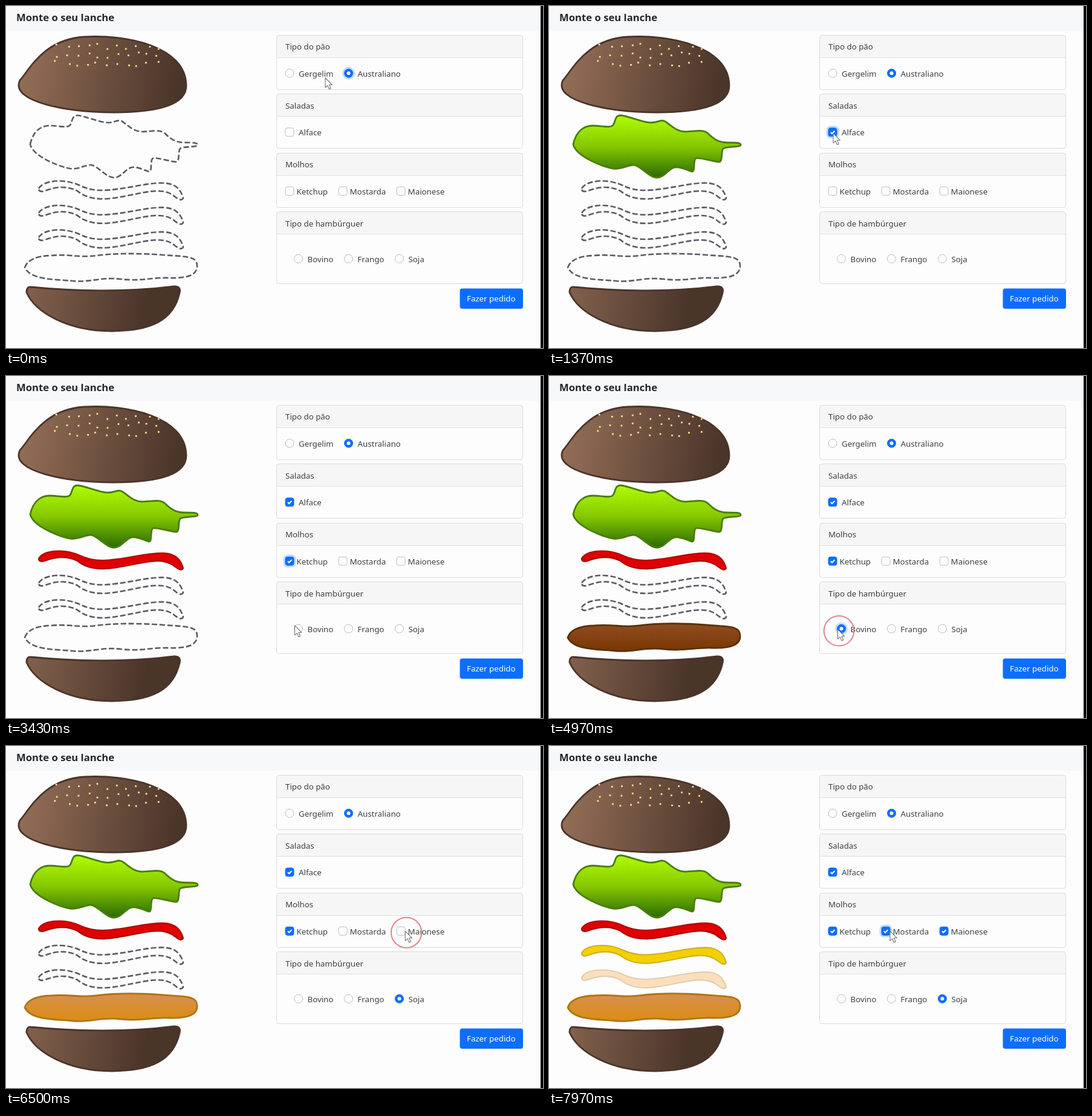
Animation of 888 by 566 pixels, one loop 8000 ms. Source, as an HTML page with a canvas:

```html
<!DOCTYPE html>
<html lang="pt">
<head>
<meta charset="utf-8">
<title>Monte o seu lanche</title>
<style>
html, body { margin: 0; width: 100%; height: 100%; overflow: hidden; background: #fdfdfd; }
canvas { display: block; width: 888px; height: 566px; }
</style>
</head>
<body>
<canvas id="stage" width="888" height="566"></canvas>
<script>
const ctx = document.getElementById('stage').getContext('2d');
const LOOP = 8000, RING_MS = 400, MOVE_MS = 410;
const FONT = '"Noto Sans", "Open Sans", sans-serif';
const TEXT_SIZE = 13.3, BLUE = '#0d6efd', PAGE = '#fdfdfd';

const topBun = new Path2D(`M23 123C40 104 62 55 130 51S298 66 298 132
  C298 160 262 176 178 176C100 176 6 158 23 123Z`);
const bottomBun = new Path2D(`M41 465C110 472 200 474 278 464Q290 464 287 475
  C277 520 240 538 175 538C100 538 48 506 34 474Q34 464 41 465Z`);
const lettuce = new Path2D(`M40 229C45 205 60 198 72 198S100 202 105 198S108 181 118 181
  S155 193 168 193S185 187 192 191S210 208 225 208S255 203 263 211S280 226 295 226
  S317 226 317 230S292 232 288 236S288 258 281 258S248 250 243 252S242 274 237 274
  S215 263 205 268S190 284 178 284S150 263 140 263S120 271 106 269S45 250 40 229Z`);
const sauce = new Path2D(`M54 302C62 288 97 285 122 297S170 306 215 298S285 288 293 318
  Q290 324 280 316C262 300 235 307 205 313S142 326 118 306C102 298 85 298 64 306Q54 309 54 302Z`);
const patty = new Path2D(`M31 433Q37 414 75 413C105 410 120 417 150 413S220 409 260 412
  S315 414 316 429S303 451 270 450S225 456 190 452S140 458 110 455S42 454 31 433Z`);

function gradient(x0, y0, x1, y1, ...colors) {
  const g = ctx.createLinearGradient(x0, y0, x1, y1);
  colors.forEach((c, i) => g.addColorStop(i / (colors.length - 1), c));
  return g;
}
const bread = gradient(22, 0, 298, 40, '#98725a', '#4a3529');
const leaf = gradient(0, 181, 0, 284, '#b0fc04', '#85c800', '#2a6a00');
const grill = (from, to) => gradient(0, 410, 0, 457, from, to);
const meats = {
  Bovino: [grill('#8f4d22', '#793500'), '#59320a'],
  Frango: [grill('#edc899', '#dfb26a'), '#b49040'],
  Soja: [grill('#d78f50', '#dc8d10'), '#ad7612']
};
const sauces = {
  Ketchup: ['#e00000', '#aa0808'],
  Mostarda: ['#f4d000', '#cdb02a'],
  Maionese: ['#fddebc', '#ddd0ae']
};

// aim: where the pointer rests relative to a control
const cards = [
  { title: 'Tipo do pão', items: ['Gergelim', 'Australiano'], radio: true, gap: 15 },
  { title: 'Saladas', items: ['Alface'], gap: 15, aim: [1, 2] },
  { title: 'Molhos', items: ['Ketchup', 'Mostarda', 'Maionese'], gap: 11.5, aim: [7, 0] },
  { title: 'Tipo de hambúrguer', items: ['Bovino', 'Frango', 'Soja'], radio: true, gap: 15,
    inset: 14.5, aim: [-6, 1] }
];
const controls = {};

function layout() {
  ctx.font = `${TEXT_SIZE}px ${FONT}`;
  cards.forEach((card, i) => {
    const inset = card.inset || 0;
    card.top = 48 + i * 97.5;
    card.height = 90 + 2 * inset;
    let x = 469 + inset;
    for (const name of card.items) {
      controls[name] = { x, y: card.top + 63.3 + inset, card };
      x += card.gap + ctx.measureText(name).width + 25;
    }
  });
}

// [press time, control]; the control switches half-way through the ring
const presses = [[850, 'Alface'], [1856, 'Alface'], [2400, 'Alface'], [2900, 'Ketchup'],
  [3500, 'Bovino'], [4150, 'Frango'], [4684, 'Bovino'], [5400, 'Soja'],
  [6386, 'Maionese'], [7400, 'Mostarda']];

const clamp = u => Math.min(1, Math.max(0, u));
const ease = u => u * u * (3 - 2 * u);

function pointer(t) {
  let x = 528, y = 119;
  for (const [press, name] of presses) {
    const { x: cx, y: cy, card } = controls[name];
    const e = ease(clamp((t - press + MOVE_MS + 10) / MOVE_MS));
    x += (cx + card.aim[0] - x) * e;
    y += (cy + card.aim[1] - y) * e;
  }
  return [x, y];
}

function stateAt(t) {
  const s = { on: new Set(['Australiano']), meat: null, focus: 'Australiano', ring: 0 };
  for (const [press, name] of presses) {
    if (t < press) break;
    if (s.focus !== name) s.focus = null;
    if (t < press + RING_MS) s.ring = 32 * Math.sin(Math.PI * (t - press) / RING_MS);
    if (t < press + RING_MS / 2) continue;
    s.focus = name;
    if (meats[name]) s.meat = name;
    else if (!s.on.delete(name)) s.on.add(name);
  }
  if (s.meat) s.on.add(s.meat);
  return s;
}

function text(str, x, y, color = '#3b3f44', size = TEXT_SIZE, weight = 400) {
  ctx.font = `${weight} ${size}px ${FONT}`;
  ctx.fillStyle = color;
  ctx.fillText(str, x, y);
}

function paint(path, fill, line, width = 2.8) {
  ctx.fillStyle = fill;
  ctx.fill(path);
  ctx.strokeStyle = line;
  ctx.lineWidth = width;
  ctx.stroke(path);
}

function box(x, y, w, h, r) {
  const p = new Path2D();
  p.roundRect(x, y, w, h, r);
  return p;
}

function disc(x, y, r) {
  const p = new Path2D();
  p.arc(x, y, r, 0, 2 * Math.PI);
  return p;
}

// An ingredient, or its dashed outline while it has no colours
function layer(path, colors, dy = 0) {
  ctx.save();
  ctx.translate(0, dy);
  if (colors) paint(path, ...colors);
  else {
    ctx.setLineDash([9, 3.8]);
    ctx.strokeStyle = '#5b5b63';
    ctx.lineWidth = 2.6;
    ctx.stroke(path);
  }
  ctx.restore();
}

function drawSeeds() {
  const jitter = k => { const v = Math.sin(k * 127.1) * 43758.5; return v - Math.floor(v) - 0.5; };
  ctx.fillStyle = '#fbe091';
  for (let i = 0; i < 33; i++) {
    const x = 85 + (i % 11) * 16.5 + jitter(i + 1) * 9;
    const y = 67 + Math.floor(i / 11) * 14 + jitter(i + 50) * 10;
    ctx.fillRect(x - 1.3, y - 1.3, 2.8, 2.8);
  }
}

function drawBurger(s) {
  const crust = '#4b342a';
  paint(topBun, bread, crust);
  drawSeeds();
  layer(lettuce, s.on.has('Alface') && [leaf, '#4b7c10']);
  Object.keys(sauces).forEach((name, i) =>
    layer(sauce, s.on.has(name) && [...sauces[name], 2.2], i * 40.5));
  layer(patty, meats[s.meat]);
  paint(bottomBun, bread, crust);
}

function drawControl(name, s) {
  const { x, y, card } = controls[name];
  const on = s.on.has(name), focus = s.focus === name;
  const shape = r => card.radio ? disc(x, y, r) : box(x - r, y - r, 2 * r, 2 * r, r - 3.5);
  if (focus) {
    ctx.fillStyle = '#c2dbfe';
    ctx.fill(shape(10.5));
  }
  const empty = focus && s.ring ? '#e5e5e5' : PAGE;
  paint(shape(7), on ? BLUE : empty, on ? BLUE : focus ? '#86b7fe' : '#bdbdc0', 1);
  if (on && card.radio) {
    ctx.fillStyle = '#fff';
    ctx.fill(disc(x, y, 3));
  } else if (on) {
    ctx.strokeStyle = '#fff';
    ctx.lineWidth = 2;
    ctx.stroke(new Path2D(`M${x - 3.2} ${y + 0.2}l2.3 2.3 4.3 -4.6`));
  }
  text(name, x + card.gap, y + 5.3);
}

function drawForm(s) {
  for (const { title, top, height } of cards) {
    const y = Math.floor(top) + 0.5;
    ctx.fillStyle = '#f6f6f7';
    ctx.fill(box(447.5, y, 407, 37, [4, 4, 0, 0]));
    ctx.fillStyle = '#e0e0e2';
    ctx.fillRect(447.5, y + 36.5, 407, 1);
    ctx.strokeStyle = '#dadadd';
    ctx.lineWidth = 1;
    ctx.stroke(box(447.5, y, 407, height, 4));
    text(title, 462, top + 24);
  }
  for (const name in controls) drawControl(name, s);
  ctx.fillStyle = BLUE;
  ctx.fill(box(750.5, 467.5, 104.5, 33.5, 4));
  text('Fazer pedido', 762, 489.3, '#fff');
}

function drawPointer(t, s) {
  const [x, y] = pointer(t);
  if (s.ring) {
    ctx.strokeStyle = '#e3838c';
    ctx.lineWidth = 2;
    ctx.stroke(disc(x + 2, y + 2.5, s.ring));
  }
  paint(new Path2D(`M${x} ${y}v16l3.7 -3.4 2.8 6.2 2.7 -1.2 -2.8 -6.1h5z`), PAGE, '#76767a', 1.1);
}

function draw(t) {
  const s = stateAt(t);
  ctx.fillStyle = PAGE;
  ctx.fillRect(0, 0, 888, 566);
  ctx.fillStyle = '#f7f8fa';
  ctx.fillRect(0, 0, 884, 41);
  text('Monte o seu lanche', 17, 24.7, '#24272b', 16.7, 600);
  drawBurger(s);
  drawForm(s);
  drawPointer(t, s);
  ctx.fillStyle = '#000';
  ctx.fillRect(884, 0, 4, 566);
}

layout();
ctx.lineJoin = 'round';
const start = performance.now();
function tick() {
  draw((performance.now() - start) % LOOP);
  requestAnimationFrame(tick);
}
tick();
</script>
</body>
</html>
```
